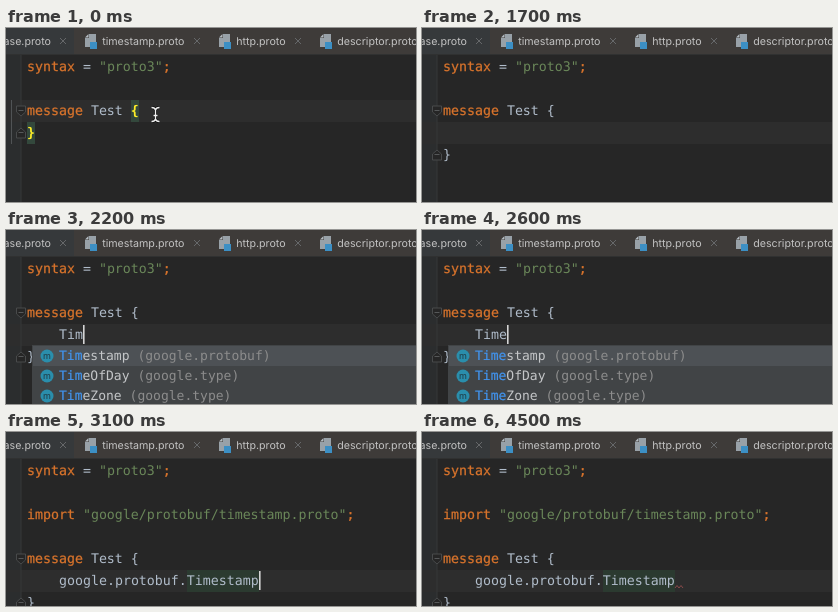
Animation of 410x174 px, one loop 4.6 s. Source, as an HTML page:

```html
<!DOCTYPE html>
<html lang="en">
<head>
<meta charset="utf-8">
<title>Editor completion</title>
<style>
html, body { margin: 0; width: 100%; height: 100%; overflow: hidden; background: #262626; }
svg { display: block; width: 410px; height: 174px; }
text { white-space: pre; text-rendering: geometricPrecision; }
.code { font: 13.288px "DejaVu Sans Mono", monospace; fill: #b0bcca; }
.item { font: 13.03px "DejaVu Sans Mono", monospace; fill: #c4c6c8; }
.tab { font: 10.68px Inter, sans-serif; fill: #c2c2c2; }
.kw { fill: #d9742c; stroke: #d9742c; stroke-width: .25px; }
.str { fill: #6a8759; }
.hit { fill: #4294ee; stroke: #4294ee; stroke-width: .2px; }
.dim { fill: #8c8c8c; }
.brace { fill: #ffef28; font-weight: bold; }
</style>
</head>
<body>
<svg id="stage" viewBox="0 0 410 174" xmlns="http://www.w3.org/2000/svg">
  <rect width="410" height="174" fill="#262626"/>
  <rect width="15" height="174" fill="#2b2d2e"/>
  <g id="editor"></g>
  <g id="tabs"></g>
</svg>
<script>
const LOOP = 4600, LEFT = 21, CHAR = 8, ROW = 22, TOP = 28;
const editor = document.getElementById('editor');

const rect = (x, y, w, h, fill) =>
  `<rect x="${x}" y="${y}" width="${w}" height="${h}" fill="${fill}"/>`;
const path = (d, stroke, width = 1, fill = 'none') =>
  `<path d="${d}" stroke="${stroke}" stroke-width="${width}" fill="${fill}"/>`;
const span = (cls, s) => `<tspan class="${cls}">${s}</tspan>`;
const text = (x, y, s, cls = 'code') => `<text class="${cls}" x="${x}" y="${y}">${s}</text>`;
const rowTop = row => TOP + ROW * row;
const colX = col => LEFT + CHAR * col;
const line = (row, s, col = 0) => text(colX(col), rowTop(row) + 15, s);

// Tab strip
const closeMark = x => path(`M${x - 3} 10l6 6m0-6l-6 6`, '#66686a');
const fileIcon = x =>
  path(`M${x + 5} 6h7v13h-11v-9h4z`, 'none', 0, '#98a1a8') +
  path(`M${x + 1} 9.5l3.5-3.5v3.5z`, 'none', 0, '#b4bcc2') +
  rect(x + 6, 14, 7, 7, '#3c8fc4');
const tab = (x, name, close) =>
  fileIcon(x) + text(x + 18.2, 17, name, 'tab') + (close ? closeMark(close) : '');

document.getElementById('tabs').innerHTML =
  rect(0, 0, 410, 26, '#3e3b39') + rect(0, 0, 68, 26, '#36393b') + rect(0, 26, 410, 1, '#303131') +
  '<text class="tab" x="45" y="17" text-anchor="end">base.proto</text>' + closeMark(57) +
  tab(78, 'timestamp.proto', 191) + tab(212, 'http.proto', 292) + tab(313, 'descriptor.proto');

// Fold handle: dir 1 points down, -1 points up
function fold(row, dir) {
  const y = rowTop(row) + 11;
  return path(`M10.5 ${y - 5 * dir}h9v${6 * dir}l-4.5 ${4 * dir}l-4.5 ${-4 * dir}z`, '#484a4b', 1, '#262626') +
    path(`M12.5 ${y - .5}h5`, '#565859');
}

const caret = (row, col) => rect(colX(col), rowTop(row) + 1, 1.6, 19, '#d4d4d4');
const currentLine = row => rect(0, rowTop(row), 410, ROW, '#2d2d2d');

function popup(typed) {
  const items = [['Timestamp', 'protobuf'], ['TimeOfDay', 'type'], ['TimeZone', 'type']];
  let out = rect(26, 115, 384, 59, '#414446') + rect(27, 116, 383, 20, '#4d5155');
  items.forEach(([name, pkg], i) => {
    const y = 126 + 20 * i;
    out += `<circle cx="41" cy="${y}" r="6.5" fill="#2a8eac"/>` +
      `<text x="41" y="${y + 3}" text-anchor="middle" font-family="Inter, sans-serif" font-size="9" fill="#1f3a44">m</text>` +
      text(53, y + 4, span('hit', name.slice(0, typed)) + name.slice(typed) + span('dim', ` (google.${pkg})`), 'item');
  });
  return out;
}

const mouse = () => {
  const d = 'M145.5 79.5q3.5 0 4 2.5v9q-.5 2.5-4 2.5M153.5 79.5q-3.5 0-4 2.5v9q.5 2.5 4 2.5M147.5 87.5h4';
  return path(d, '#111', 3) + path(d, '#f0f0f0', 1.3);
};

const squiggle = () => path('M253 156l2-2.5l2 2.5l2-2.5l2 2.5', '#8a4a4a');

// [from ms, phase, typed letters, caret visible]
const steps = [
  [0, 'start', 0, 0], [200, 'start', 0, 1],
  [700, 'blank', 0, 1], [1200, 'blank', 0, 0],
  [1800, 'type', 1, 1], [2000, 'type', 2, 1], [2200, 'type', 3, 1], [2400, 'type', 4, 1],
  [3100, 'done', 0, 1], [3600, 'done', 0, 0], [4000, 'done', 0, 1], [4400, 'done', 0, 0]
];

function draw(t) {
  const [, phase, typed, blink] = steps.findLast(s => s[0] <= t);
  const start = phase === 'start', done = phase === 'done';
  const open = done ? 4 : 2, close = open + (start ? 1 : 2);
  const active = start ? open : open + 1;
  const brace = s => start ? span('brace', s) : s;

  let out = currentLine(active);
  if (start) {
    out += rect(5, 72, 1, 44, '#505355') +
      rect(colX(13), 72, CHAR, ROW, '#33483c') + rect(LEFT, 94, CHAR, ROW, '#33483c');
  }
  if (done) out += rect(colX(20), rowTop(5), 72, ROW, '#2b3a30');
  out += path('M15 27V174', '#363839') + fold(open, 1) + fold(close, -1);

  out += line(0, span('kw', 'syntax') + ' = ' + span('str', '"proto3"') + span('kw', ';'));
  if (done) {
    out += line(2, span('kw', 'import ') + span('str', '"google/protobuf/timestamp.proto"') + span('kw', ';')) +
      line(5, 'google.protobuf.Timestamp', 4);
    if (t >= 3700) out += squiggle();
  }
  out += line(open, span('kw', 'message') + ' Test ' + brace('{')) + line(close, brace('}'));
  if (typed) out += line(active, 'Time'.slice(0, typed), 4) + popup(typed);
  if (blink) out += caret(active, start ? 14 : done ? 29 : 4 + typed);
  if (start) out += mouse();
  return out;
}

let shown = '';
const begin = performance.now();
function tick() {
  const next = draw(Math.max(0, performance.now() - begin) % LOOP);
  if (next !== shown) editor.innerHTML = shown = next;
  requestAnimationFrame(tick);
}
tick();
</script>
</body>
</html>
```
